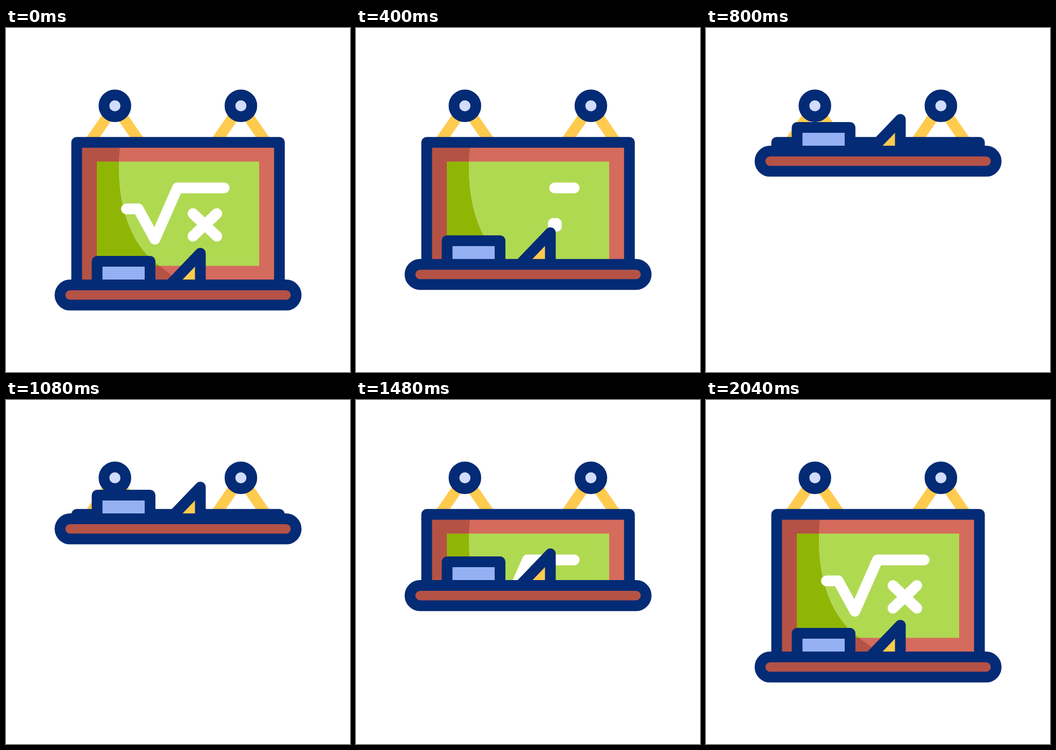
Write an HTML page that moves like this. It is 640 px wide and 640 px high and loops after 2200 ms.

```html
<!DOCTYPE html>
<html lang="en">
<head>
<meta charset="utf-8">
<title>Roll-up blackboard</title>
<style>
  html, body { margin: 0; width: 100%; height: 100%; overflow: hidden; background: #fff; }
  svg { display: block; width: 100%; height: 100%; }
  .ink { stroke: #042b75; stroke-width: 20; stroke-linejoin: round; stroke-linecap: round; }
  #chalk { fill: none; stroke: #fff; stroke-width: 20; stroke-linejoin: round; stroke-linecap: round; }
</style>
</head>
<body>
<svg viewBox="0 0 640 640">
  <defs>
    <g id="hook">
      <path d="M-46.4 67.3L0 0L46.4 67.3" fill="none" stroke="#ffcb4f" stroke-width="20"/>
      <circle class="ink" r="20.3" fill="#d2dcfd"/>
    </g>
    <clipPath id="unrolled"><rect id="window" width="640" height="497"/></clipPath>
    <clipPath id="shade">
      <path d="M130 222H212C203 300 219 396 285 442.5Q303 455 320 470V510H130Z"/>
    </clipPath>
  </defs>

  <use href="#hook" x="202.6" y="144.7"/>
  <use href="#hook" x="437" y="144.7"/>

  <g clip-path="url(#unrolled)">
    <path d="M131.5 212.7H508.7V510H131.5Z" fill="#d56b5d"/>
    <path d="M169 248.5H471V442.5H169Z" fill="#b0d952"/>
    <g clip-path="url(#shade)">
      <path d="M131.5 212.7H508.7V510H131.5Z" fill="#b55246"/>
      <path d="M169 248.5H471V442.5H169Z" fill="#90b605"/>
    </g>
    <g id="chalk">
      <path id="root" pathLength="1" d="M224 336.5H246L277 393L319 297.5H406"/>
      <path id="cross"/>
    </g>
    <path class="ink" d="M131.5 212.7H508.7V510H131.5Z" fill="none"/>
  </g>

  <g id="tray">
    <path class="ink" d="M169.5 478V434H268V478" fill="#95b1f3"/>
    <path class="ink" d="M305 478L361.6 419V478" fill="#ffcb4f"/>
    <rect class="ink" x="100.5" y="478" width="439.3" height="37.6" rx="18.8" fill="#b55246"/>
  </g>
</svg>
<script>
  const LOOP = 2200, STEP = 40, LIFT = 257;
  const ROLL = 800, WIPE = 360;      // durations
  const UP = 200, DOWN = 1200;       // start times
  const $ = id => document.getElementById(id);

  // cubic-bezier(.54, 0, .072, 1), solved by bisection
  function ease(x) {
    if (x <= 0) return 0;
    if (x >= 1) return 1;
    let lo = 0, hi = 1, s;
    for (let i = 0; i < 30; i++) {
      s = (lo + hi) / 2;
      const u = 1 - s;
      if (3 * .54 * s * u * u + 3 * .072 * s * s * u + s ** 3 < x) lo = s; else hi = s;
    }
    return s * s * (3 - 2 * s);
  }

  // 0 at rest, 1 when rolled up or wiped
  const cycle = (t, span) => ease((t - UP) / span) - ease((t - DOWN) / span);

  function draw(t) {
    const lift = LIFT * cycle(t, ROLL);
    $('tray').setAttribute('transform', `translate(0 ${-lift})`);
    $('window').setAttribute('height', 497 - lift);

    const left = 1 - cycle(t, WIPE);
    $('chalk').style.display = left > .001 ? '' : 'none';
    $('root').style.strokeDasharray = `${left} 2`;
    $('root').style.strokeDashoffset = left - 1;
    const dx = 22.2 * left, dy = 21 * left;
    $('cross').setAttribute('d',
      `M${370 - dx} ${366.3 - dy}l${2 * dx} ${2 * dy}M${370 + dx} ${366.3 - dy}l${-2 * dx} ${2 * dy}`);
  }

  const start = performance.now();
  function tick() {
    const t = (performance.now() - start) % LOOP;
    draw(Math.floor(t / STEP) * STEP);
    requestAnimationFrame(tick);
  }
  tick();
</script>
</body>
</html>
```
